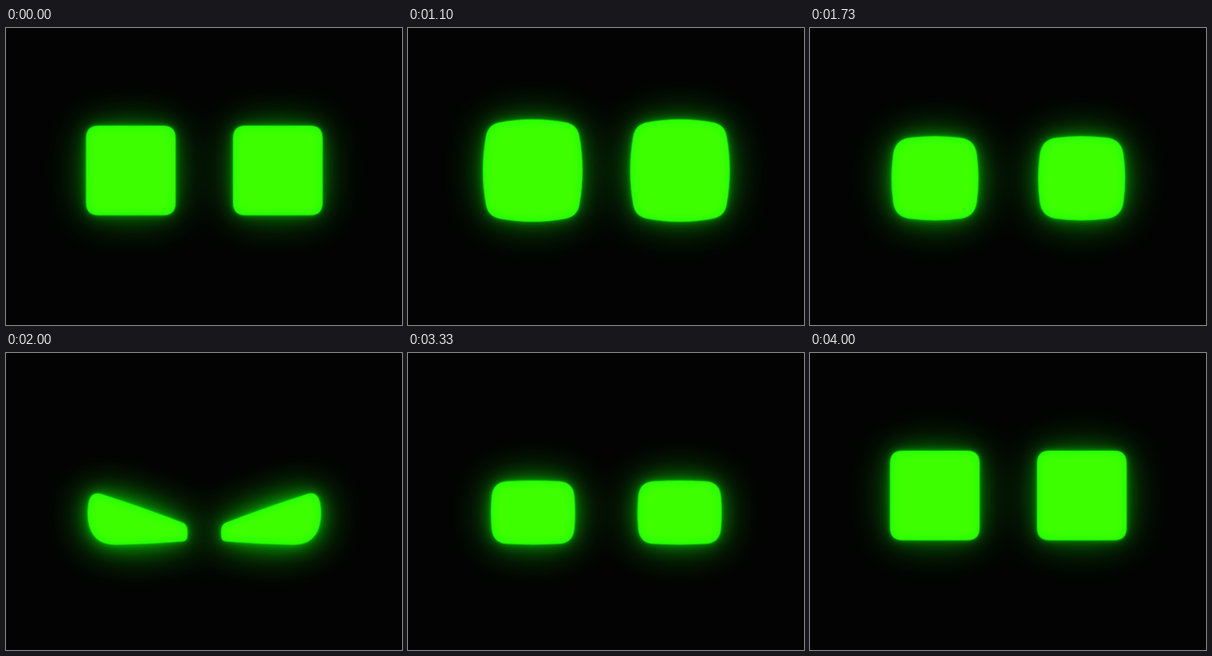
Write an HTML page that moves like this. It is 640 px wide and 480 px high and loops after 4.03 s.

```html
<!DOCTYPE html>
<html lang="en">
<head>
<meta charset="utf-8">
<title>Glowing eyes</title>
<style>
  html, body { margin: 0; width: 100%; height: 100%; overflow: hidden; background: #030303; }
  svg { display: block; width: 100vw; height: 100vh; }
</style>
</head>
<body>
<svg viewBox="0 0 640 480">
  <defs>
    <filter id="glow" filterUnits="userSpaceOnUse" x="0" y="0" width="640" height="480" color-interpolation-filters="sRGB">
      <feFlood flood-color="#3eff00" result="warm"/>
      <feGaussianBlur in="SourceAlpha" stdDeviation="8" result="soft"/>
      <feComposite in="warm" in2="soft" operator="in"/>
      <feComposite in2="SourceAlpha" operator="in" result="core"/>
      <feGaussianBlur in="SourceGraphic" stdDeviation="34"/>
      <feComponentTransfer result="wide"><feFuncA class="halo" type="linear" slope=".45"/></feComponentTransfer>
      <feGaussianBlur in="SourceGraphic" stdDeviation="14"/>
      <feComponentTransfer result="mid"><feFuncA class="halo" type="linear" slope=".3"/></feComponentTransfer>
      <feGaussianBlur in="SourceGraphic" stdDeviation="5"/>
      <feComponentTransfer result="near"><feFuncA type="linear" slope=".5"/></feComponentTransfer>
      <feGaussianBlur in="SourceGraphic" stdDeviation=".8" result="shape"/>
      <feMerge>
        <feMergeNode in="wide"/>
        <feMergeNode in="mid"/>
        <feMergeNode in="near"/>
        <feMergeNode in="shape"/>
        <feMergeNode in="core"/>
      </feMerge>
    </filter>
  </defs>
  <rect width="640" height="480" fill="#030303"/>
  <g filter="url(#glow)" fill="#0cff00">
    <path class="eye"/>
    <path class="eye" transform="matrix(-1 0 0 1 641 0)"/>
  </g>
</svg>
<script>
const LOOP = 4030;
const eyes = document.querySelectorAll('.eye');
const halos = [...document.querySelectorAll('.halo')]
  .map(node => ({ node, base: +node.getAttribute('slope') }));

// A pose: four corners clockwise from top left, four corner radii,
// edge bulge, halo strength.
const box = (l, t, r, b, radius, bulge, halo = 1) =>
  [l, t, r, t, r, b, l, b, radius, radius, radius, radius, bulge, halo];

const square = box(129.5, 158, 274, 302.5, 20, 0);
const shut   = box(129.5, 218, 274, 246, 13, 0, 1.4);
const wide   = box(126, 153, 277, 308, 22, 5);
const tall   = box(138, 127, 266, 303, 28, 4);
const slim   = box(146.5, 127.5, 258, 294.5, 25, 1.5);
const squash = box(130, 246, 274, 315, 24, 1, 1.4);
const fierce = [134, 221, 293, 277, 293, 304, 131, 312, 22, 8, 7, 46, 1, 1.75];
const glare  = [131, 231, 295, 283, 295, 306, 125, 308, 8, 7, 6, 50, .8, 1.8];

const keys = [
  [0, square], [280, shut], [620, wide], [1080, wide],
  [1380, tall], [1650, tall], [1830, squash], [2000, fierce],
  [2300, glare], [2870, glare], [3190, squash],
  [3560, slim], [3630, slim], [3880, square], [LOOP, square]
];

const smooth = u => u * u * (3 - 2 * u);

function poseAt(t) {
  const i = keys.findIndex(k => k[0] > t);
  const [t0, a] = keys[i - 1], [t1, b] = keys[i];
  const u = smooth((t - t0) / (t1 - t0));
  return a.map((v, n) => v + (b[n] - v) * u);
}

// Meeting point of the lines a-b and c-d.
function meet(a, b, c, d) {
  const ux = b[0] - a[0], uy = b[1] - a[1], vx = d[0] - c[0], vy = d[1] - c[1];
  const s = ((c[0] - a[0]) * vy - (c[1] - a[1]) * vx) / (ux * vy - uy * vx);
  return [a[0] + ux * s, a[1] + uy * s];
}

function outline(pose) {
  const bulge = pose[12];
  const corner = i => [pose[2 * (i % 4)], pose[2 * (i % 4) + 1]];
  const edges = [0, 1, 2, 3].map(i => {
    const [ax, ay] = corner(i), [bx, by] = corner(i + 1);
    const len = Math.hypot(bx - ax, by - ay);
    const ux = (bx - ax) / len, uy = (by - ay) / len;
    const r0 = Math.min(pose[8 + i], len * .48);
    const r1 = Math.min(pose[8 + (i + 1) % 4], len * .48);
    const from = [ax + ux * r0, ay + uy * r0];
    const to = [bx - ux * r1, by - uy * r1];
    const bow = 2 * bulge * Math.min(1, len / 100);
    const ctrl = [(from[0] + to[0]) / 2 + uy * bow, (from[1] + to[1]) / 2 - ux * bow];
    return { from, ctrl, to };
  });
  const d = edges.map((e, i) => {
    const next = edges[(i + 1) % 4];
    const turn = meet(e.ctrl, e.to, next.ctrl, next.from);
    return `Q${e.ctrl} ${e.to}Q${turn} ${next.from}`;
  });
  return `M${edges[0].from}${d.join('')}Z`;
}

function draw(t) {
  const pose = poseAt(t);
  const d = outline(pose);
  eyes.forEach(eye => eye.setAttribute('d', d));
  halos.forEach(({ node, base }) => node.setAttribute('slope', base * pose[13]));
}

const start = performance.now();
function tick() {
  draw((performance.now() - start) % LOOP);
  requestAnimationFrame(tick);
}
tick();
</script>
</body>
</html>
```
